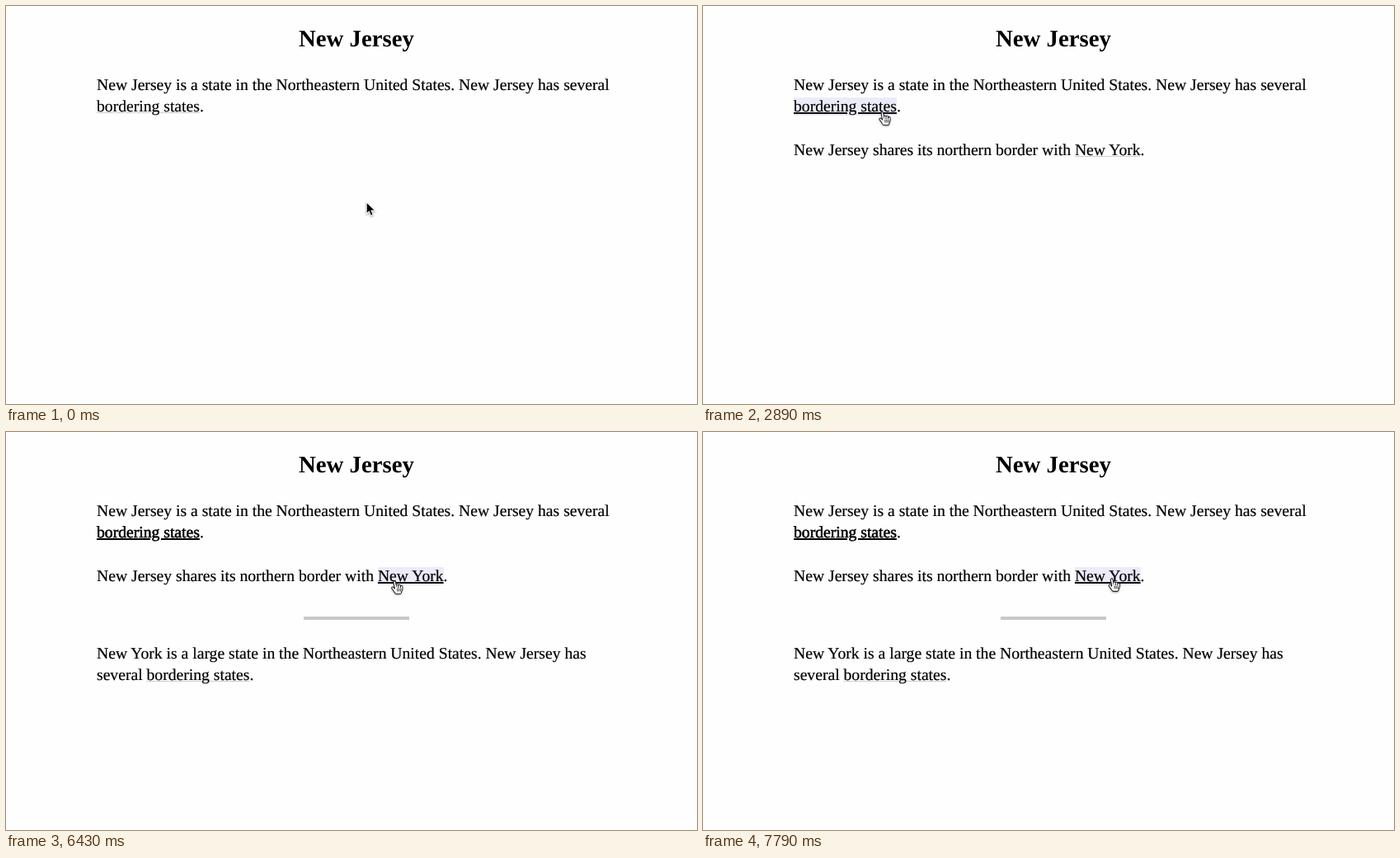
Write an HTML page that moves like this. It is 838 px wide and 483 px high and loops after 8000 ms.

```html
<!DOCTYPE html>
<html lang="en">
<head>
<meta charset="utf-8">
<title>New Jersey</title>
<style>
html, body { margin: 0; width: 100%; height: 100%; overflow: hidden; background: #fefefe; }
body { position: relative; color: #000; font: 19.65px/22px "Liberation Serif", serif; text-rendering: geometricPrecision; }
h1, p, hr { position: absolute; left: 110px; margin: 0; white-space: nowrap; }
h1 { top: 24px; width: 630px; font: bold 28.8px/32px "Liberation Serif", serif; text-align: center; }
p { -webkit-text-stroke: .2px #000; }
hr { left: 361px; top: 224px; width: 128px; height: 4px; border: 0; background: #c8c8c8; }
a { text-decoration: underline 1px #ccc; text-underline-offset: 1px; }
a.open { background: #ebebfa; text-decoration-color: transparent; }
a.hover { text-decoration: underline 1.5px #111; }
a.done { background: none; text-decoration: underline 1.5px #000; -webkit-text-stroke: .6px #000; }
svg { position: absolute; left: 0; top: 0; width: 838px; height: 483px; }
#cursor { filter: drop-shadow(0 1px .8px #0006); }
#arrow { stroke: #fff; stroke-width: 2; paint-order: stroke; }
#hand { fill: #fff; stroke: #000; stroke-linejoin: round; stroke-linecap: round; }
</style>
</head>
<body>
<h1>New Jersey</h1>
<p style="top:85px">New Jersey is a state in the Northeastern United States. New Jersey has several</p>
<p style="top:111px"><a id="states">bordering states</a>.</p>
<p class="second" style="top:164px">New Jersey shares its northern border with <a id="york">New York</a>.</p>
<hr class="third">
<p class="third" style="top:258px">New York is a large state in the Northeastern United States. New Jersey has</p>
<p class="third" style="top:284px">several <a>bordering states</a>.</p>
<svg>
  <defs>
    <path id="fingers" d="M12.1 9l1.6 8M15.4 13v4M18 13.3v4M20.6 14.6v3M9.9 16.2l3 4M13.5 17h7.1l-1.6 5h-5l-1.5-2z"/>
  </defs>
  <g id="cursor">
    <path id="arrow" d="M9.2 6.8v11.8l2.8-2.7 2.2 5.4 1.9-.8-2.3-5.2h4.2z"/>
    <g id="hand">
      <use href="#fingers" stroke-width="3.3"/>
      <use href="#fingers" stroke="#fff" stroke-width="1.7"/>
      <path stroke-width=".8" d="M15.6 17v3m2 0v-3m2 0v3"/>
    </g>
  </g>
</svg>
<script>
const LOOP = 8000, CLICK_STATES = 2020, CLICK_YORK = 4370;

// Each move is an eased curve from the last resting place, bent toward a control point
const home = [437.5, 238.5];
const moves = [
  { start: 490, end: 1250, bend: [258, 208], to: [222, 128] },
  { start: 1290, end: 1430, bend: [220, 128], to: [218, 129] },
  { start: 2880, end: 3700, bend: [470, 248], to: [472, 181] },
  { start: 6420, end: 7230, bend: [527, 273], to: [545, 162] },
  { start: 7230, end: 7790, bend: [520, 138], to: [496.5, 178] }
];

const $ = id => document.getElementById(id);
const states = $("states"), york = $("york");
const ease = u => u * u * (3 - 2 * u);

function pointAt(t) {
  let from = home;
  for (const { start, end, bend, to } of moves) {
    if (t < start) break;
    const s = ease(Math.min(1, (t - start) / (end - start))), r = 1 - s;
    from = from.map((a, k) => r * r * a + 2 * r * s * bend[k] + s * s * to[k]);
  }
  return from;
}

const show = (el, on) => { el.style.visibility = on ? "visible" : "hidden"; };
const showAll = (name, on) => document.querySelectorAll("." + name).forEach(el => show(el, on));

function isOver(el, x, y) {
  const b = el.getBoundingClientRect();
  return x > b.left && x < b.right && y > b.top && y < b.bottom;
}

function draw(now) {
  const t = now % LOOP, [x, y] = pointAt(t);
  const second = t >= CLICK_STATES, third = t >= CLICK_YORK;
  const overStates = isOver(states, x, y);
  const overYork = second && isOver(york, x, y);
  const over = overStates || overYork;

  showAll("second", second);
  showAll("third", third);
  states.classList.toggle("open", second && !third);
  states.classList.toggle("done", third);
  states.classList.toggle("hover", overStates);
  york.classList.toggle("open", third);
  york.classList.toggle("hover", overYork);

  show($("hand"), over);
  show($("arrow"), !over);
  const [hx, hy] = over ? [13, 8] : [9, 6];
  $("cursor").setAttribute("transform", `translate(${x - hx} ${y - hy})`);
}

const start = performance.now();
function tick() {
  draw(performance.now() - start);
  requestAnimationFrame(tick);
}
tick();
</script>
</body>
</html>
```
